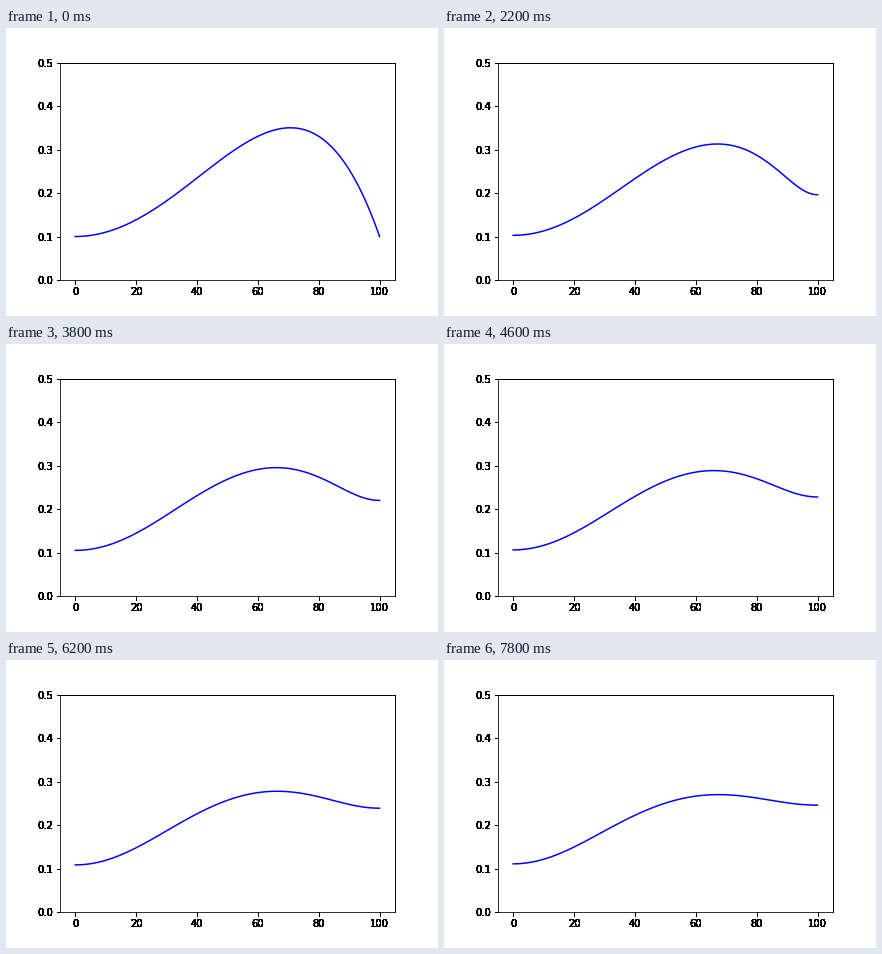
A matplotlib script for the animation above (8 s loop, 432x288 px).

```python
import numpy as np
import matplotlib.pyplot as plt
from matplotlib.animation import FuncAnimation

FRAMES = 40
INTERVAL = 200
SUBSTEPS = 40
RECT = [0.125, 0.125, 0.775, 0.755]
RATE, POWER = 0.00706, 1.77    # diffusivity per frame: RATE * u**POWER
INK_LAYERS = 14                # stacked labels give the hard, heavy text


def curvature(u, dx):
    """Second derivative with mirrored (zero slope) ends."""
    p = np.concatenate(([u[1]], u, [u[-2]]))
    return (p[2:] - 2 * u + p[:-2]) / dx**2


def solve(x):
    dx = x[1] - x[0]
    u = 0.1 + x**2 - x**4
    states = [u]
    for _ in range(FRAMES - 1):
        for _ in range(SUBSTEPS):
            u = u + RATE / SUBSTEPS * u**POWER * curvature(u, dx)
        states.append(u)
    return states


def add_axes(fig, label):
    ax = fig.add_axes(RECT, label=label)
    ax.set_xlim(-5, 105)
    ax.set_ylim(0, 0.5)
    ax.set_xticks(range(0, 101, 20))
    ax.set_yticks(np.arange(6) / 10)
    return ax


x = np.linspace(0, 1, 101)
states = solve(x)

fig = plt.figure(figsize=(6, 4), dpi=72, facecolor="white")
ax = add_axes(fig, "plot")
for k in range(INK_LAYERS):
    layer = add_axes(fig, f"ink{k}")
    layer.patch.set_visible(False)
    layer.spines[["left", "bottom"]].set_visible(False)

line, = ax.plot(100 * x, states[0], color="blue", lw=1.5)


def update(i):
    line.set_ydata(states[i])
    return line,


anim = FuncAnimation(fig, update, frames=FRAMES, interval=INTERVAL,
                     repeat=True, repeat_delay=0, blit=False)
plt.show()
```
